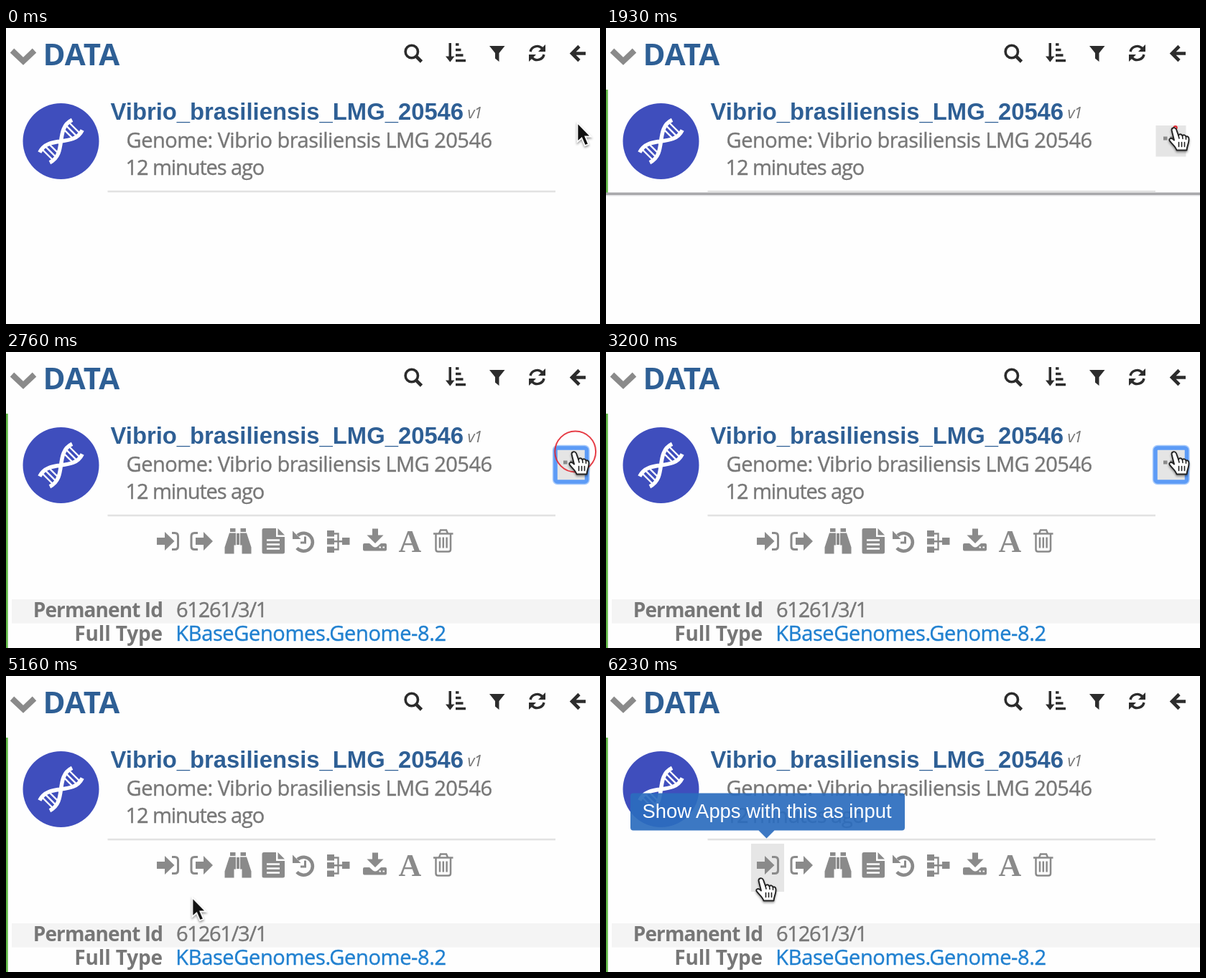
These frames come from a looping animation (827x413 px, 8 s). An HTML page:

```html
<!DOCTYPE html>
<html lang="en">
<head>
<meta charset="utf-8">
<title>Data panel</title>
<style>
  html, body { margin: 0; width: 100%; height: 100%; overflow: hidden; background: #fefefe; }
  svg { display: block; width: 827px; height: 413px; }

  text { font-family: "Open Sans", "Noto Sans", sans-serif; font-size: 29px; fill: #777; white-space: pre; }
  .body { stroke: #777; stroke-width: .4px; }
  .title { font-size: 42px; font-weight: 700; fill: #2e5f95; }
  .name { font: 700 32.8px "Liberation Sans", Arial, sans-serif; fill: #2e5f95; }
  .version { font-size: 22px; font-style: italic; letter-spacing: -1.4px; }
  .label { font-size: 28px; font-weight: 700; }
  .link { fill: #2080d0; stroke: #2080d0; stroke-width: .4px; letter-spacing: -.37px; }
  .tip text { font: 27.4px "Liberation Sans", Arial, sans-serif; fill: #fff; }
  .glyph { font: 700 44px "Liberation Serif", Times, serif; fill: #8a8a8a; }

  .dark { color: #2c2c2c; fill: #2c2c2c; }
  .grey { color: #8a8a8a; fill: #8a8a8a; }
  .line { fill: none; stroke: currentColor; stroke-width: 3; }
  .cursor { filter: drop-shadow(0 2px 1.5px rgba(0, 0, 0, .4)); }

  /* everything shares one 8 s clock */
  .anim { animation: 8s linear infinite; }
  .row-on { animation-name: row-on; animation-timing-function: step-end; }
  .button { animation-name: button; animation-timing-function: step-end; }
  .focus { animation-name: focus; animation-timing-function: step-end; }
  .arrow { animation-name: arrow; animation-timing-function: step-end; }
  .hand { animation-name: hand; animation-timing-function: step-end; }
  .icon-on { animation-name: icon-on; animation-timing-function: step-end; }
  .cover { animation-name: cover; }
  .ring { animation-name: ring, ring-fade; }
  .tip { animation-name: tip; }
  .move-x { animation-name: move-x; }
  .move-y { animation-name: move-y; }

  @keyframes row-on { 0% { opacity: 0 } 2.875%, 100% { opacity: 1 } }
  @keyframes button { 0% { opacity: 0 } 2.875% { opacity: 1 } 55.5%, 100% { opacity: 0 } }
  @keyframes focus { 0% { opacity: 0 } 24.5% { opacity: 1 } 55.5%, 100% { opacity: 0 } }
  @keyframes arrow { 0% { opacity: 1 } 3.375% { opacity: 0 } 55% { opacity: 1 } 65.75%, 100% { opacity: 0 } }
  @keyframes hand { 0% { opacity: 0 } 3.375% { opacity: 1 } 55% { opacity: 0 } 65.75%, 100% { opacity: 1 } }
  @keyframes icon-on { 0% { opacity: 0 } 65.75%, 100% { opacity: 1 } }
  @keyframes tip { 0%, 75.6% { opacity: 0 } 77.875%, 100% { opacity: 1 } }
  @keyframes cover {
    0%, 24.8% { transform: translateY(0); animation-timing-function: cubic-bezier(.37, 0, .63, 1) }
    27.3%, 100% { transform: translateY(190px) }
  }
  @keyframes ring {
    0%, 24.125% { r: 2px; animation-timing-function: cubic-bezier(.33, .67, .67, 1) }
    40%, 100% { r: 32px }
  }
  @keyframes ring-fade {
    0%, 24.12% { opacity: 0 }
    24.125%, 33.75% { opacity: 1 }
    40%, 100% { opacity: 0 }
  }
  @keyframes move-x {
    0%, 2.5% { transform: translateX(795px) }
    4.125% { transform: translateX(791px) }
    52.875% { transform: translateX(791px); animation-timing-function: cubic-bezier(.33, 0, .67, .06) }
    56.625% { transform: translateX(725px); animation-timing-function: cubic-bezier(.33, .24, .67, .71) }
    62.875% { transform: translateX(297px); animation-timing-function: cubic-bezier(.33, .84, .67, .81) }
    64.5% { transform: translateX(259px); animation-timing-function: cubic-bezier(.33, .45, .67, 1) }
    68.75%, 100% { transform: translateX(216px) }
  }
  @keyframes move-y {
    0%, 2.5% { transform: translateY(131px) }
    4.125% { transform: translateY(139px) }
    52.875% { transform: translateY(139px); animation-timing-function: cubic-bezier(.33, 0, .67, .79) }
    56.625% { transform: translateY(242px); animation-timing-function: cubic-bezier(.33, .53, .67, 1) }
    62.875% { transform: translateY(309px); animation-timing-function: cubic-bezier(.33, 0, .67, .35) }
    64.5% { transform: translateY(308px); animation-timing-function: cubic-bezier(.33, .07, .67, 1) }
    68.75%, 100% { transform: translateY(282px) }
  }
</style>
</head>
<body>
<svg viewBox="0 0 827 413">
  <rect width="827" height="413" fill="#fefefe"/>
  <rect class="anim row-on" y="86" width="2.7" height="327" fill="#62b846"/>

  <!-- expanded details -->
  <rect x="8" y="345" width="819" height="33.5" fill="#f4f4f4"/>
  <text class="label" x="37.800" y="370" letter-spacing="-.9">Permanent Id</text>
  <text class="body" x="237" y="370" letter-spacing="-1.25">61261/3/1</text>
  <text class="label" x="95.300" y="403" letter-spacing="-.15">Full Type</text>
  <text class="link" x="236.300" y="403">KBaseGenomes.Genome-8.2</text>

  <rect class="anim icon-on" x="202" y="234" width="46" height="67" fill="#e6e6e6"/>
  <g class="grey">
    <path d="M210 259h11v-8l13.5 13-13.5 13v-8h-11z"/>
    <path class="line" d="M231 252.500h4q4.500 0 4.500 4.500v14q0 4.500-4.500 4.500h-4"/>
    <path d="M264 259h11v-8l13 13-13 13v-8h-11z"/>
    <path class="line" d="M267 252.500h-4.500q-4.500 0-4.500 4.500v14q0 4.500 4.500 4.500h4.500"/>

    <g id="barrel">
      <path d="M304.500 281.500v-9l6.500-20h9v17h-2.500v12z"/>
      <path d="M312 246h7.500v5h-7.500z"/>
    </g>
    <use href="#barrel" transform="matrix(-1 0 0 1 646 0)"/>
    <path d="M321 253h4v16h-4z"/>

    <path d="M359 246h17v12h12v21q0 2.500-2.500 2.500h-26.500q-2.500 0-2.500-2.500v-30.500q0-2.500 2.500-2.500zM378.500 246l9.500 9.500h-9.500z"/>
    <path d="M363 262.500h18M363 268.500h18M363 274.500h18" stroke="#fefefe" stroke-width="2.600"/>

    <path class="line" style="stroke-width:4.600" d="M406 256A12.500 12.500 0 1 1 405 273.500"/>
    <path d="M399 249.500v11.500h11.500z"/>
    <path class="line" d="M416.500 257.500v8.500h-6.500"/>

    <path d="M447 249h10v8.500h-10zM447 260h10v8.500h-10zM447 271.500h10v8.500h-10zM468 259h10.500v10h-10.500z"/>
    <path class="line" style="stroke-width:2.400" d="M457 253.500h5.500v22h-5.500M457 264.200h12"/>

    <path d="M510 246.500h8v9h7.500l-11.500 11.500-11.500-11.500h7.500z"/>
    <path d="M499 267h7l5 4.500q3 2 6 0l5-4.500h6q2 0 2 2v6.500q0 2-2 2h-29q-2 0-2-2v-6.500q0-2 2-2z"/>
    <path d="M519.500 272.500h2.500M524.500 272.500h2.500" stroke="#fefefe" stroke-width="2.200"/>
    <text class="glyph" x="546.500" y="279">A</text>

    <g class="line" style="stroke-width:2.500">
      <path d="M595 253.500h27.500M603 253l2-4.500h8l2 4.500M598.500 254v21.500q0 3 3 3h14.500q3 0 3-3v-21.500"/>
      <path d="M604 258.500v15M608.800 258.500v15M613.600 258.500v15"/>
    </g>
  </g>

  <g class="anim cover">
    <rect y="230" width="827" height="220" fill="#fefefe"/>
    <g class="anim row-on">
      <rect y="229.500" width="827" height="3.500" fill="#a8a8ab"/>
      <rect y="233" width="827" height="1.500" fill="#e4e4e6"/>
    </g>
  </g>

  <!-- header -->
  <path class="line grey" style="stroke-width:8" d="M8.500 31.500L24 46.300l15.500-14.800"/>
  <text class="title" x="51.500" y="51.500">DATA</text>
  <g class="dark">
    <circle class="line" style="stroke-width:3.600" cx="564.800" cy="33" r="8.700"/>
    <path class="line" style="stroke-width:4.600" d="M571 39.500l7.500 7.500"/>
    <path d="M616.500 21h3.500v18.500h4.500l-6.200 8-6.300-8h4.500z"/>
    <path class="line" style="stroke-width:3.400" d="M626 23h4.500M626 30.500h7.500M626 38h10.500M626 45.500h14"/>
    <path d="M673 25h21.500l-8 10v12l-5.500-4.500v-7.500z"/>
    <g id="turn">
      <path class="line" style="stroke-width:3.400" d="M730 33A9.700 9.700 0 0 1 746.500 28.500"/>
      <path d="M751 23v10h-10z"/>
    </g>
    <use href="#turn" transform="rotate(180 739.500 35)"/>
    <path class="line" style="stroke-width:4.600" d="M807 35.500h-18M798 25.500l-10 10 10 10"/>
  </g>

  <!-- data row -->
  <circle cx="76.500" cy="158" r="53" fill="#3f4ebd"/>
  <g transform="translate(76.500 158) rotate(-45)" fill="none" stroke="#fff">
    <path d="M-32-10C-6-19 6 19 32 10M-32 10C-6 19 6-19 32-10" stroke-width="5.500"/>
    <path id="rungs" d="M14.500-9v18M20.500-10v20M26.500-10v20" stroke-width="2.300"/>
    <use href="#rungs" transform="rotate(180)"/>
  </g>
  <text class="name" x="145.500" y="128">Vibrio_brasiliensis_LMG_20546</text>
  <text class="version" x="642.500" y="126">v1</text>
  <text class="body" x="167.600" y="166.500" letter-spacing="-.52">Genome: Vibrio brasiliensis LMG 20546</text>
  <text class="body" x="166.500" y="204.700" letter-spacing="-1.1">12 minutes ago</text>
  <rect x="141.500" y="226.800" width="623.500" height="2.500" fill="#e2e2e2"/>

  <g class="anim button">
    <rect x="765.500" y="136" width="42" height="43.500" fill="#e5e5e5"/>
    <path d="M776 154h5.500M785 154h5.500M794 154h5.500" stroke="#8a8a8a" stroke-width="5"/>
  </g>
  <g class="anim focus" fill="none">
    <rect x="762" y="131" width="49.500" height="53" rx="6" stroke="#a9cbfb" stroke-width="2.500"/>
    <rect x="765" y="134" width="43.500" height="47" rx="3" stroke="#5c9bf6" stroke-width="5.500"/>
  </g>

  <g class="anim tip">
    <path d="M38 163.500h374q4 0 4 4v44q0 4-4 4h-177.500l-11 11-11-11h-174.500q-4 0-4-4v-44q0-4 4-4z" fill="#2c6dbe" fill-opacity=".92"/>
    <text x="50.500" y="198">Show Apps with this as input</text>
  </g>

  <circle class="anim ring" cx="792.700" cy="139" r="2" fill="none" stroke="#e3222c" stroke-width="2"/>

  <g class="anim move-x"><g class="anim move-y"><g class="cursor">
    <path class="anim arrow" d="M.5 1v27l6-5.500 4.500 10.500 5-2-4.500-10.500h8z" fill="#111" stroke="#fff" stroke-width="1.800"/>
    <g class="anim hand" stroke="#222" stroke-width="1.900" stroke-linejoin="round" stroke-linecap="round">
      <path d="M-3.500 3.500C-3.500-.500 1.500-1 3 2.500L6 11C7 8.500 10.500 8.500 11.500 11.500 13 9.500 15.500 10 16.500 12.800 18.500 11.500 20.500 13 20.500 16 20.800 22 18 25 17.500 31.500H3.500C2 26-4 22-6.500 18-7.500 15-3.500 13.500 0 17.500z" fill="#fff"/>
      <path d="M6.500 20.500v6M10.500 20.500v6M14.500 20.500v6M6 11l1 4M11.500 11.500l.5 4M16.500 12.800v3.500" fill="none" stroke-width="1.600"/>
    </g>
  </g></g></g>
</svg>
</body>
</html>
```
